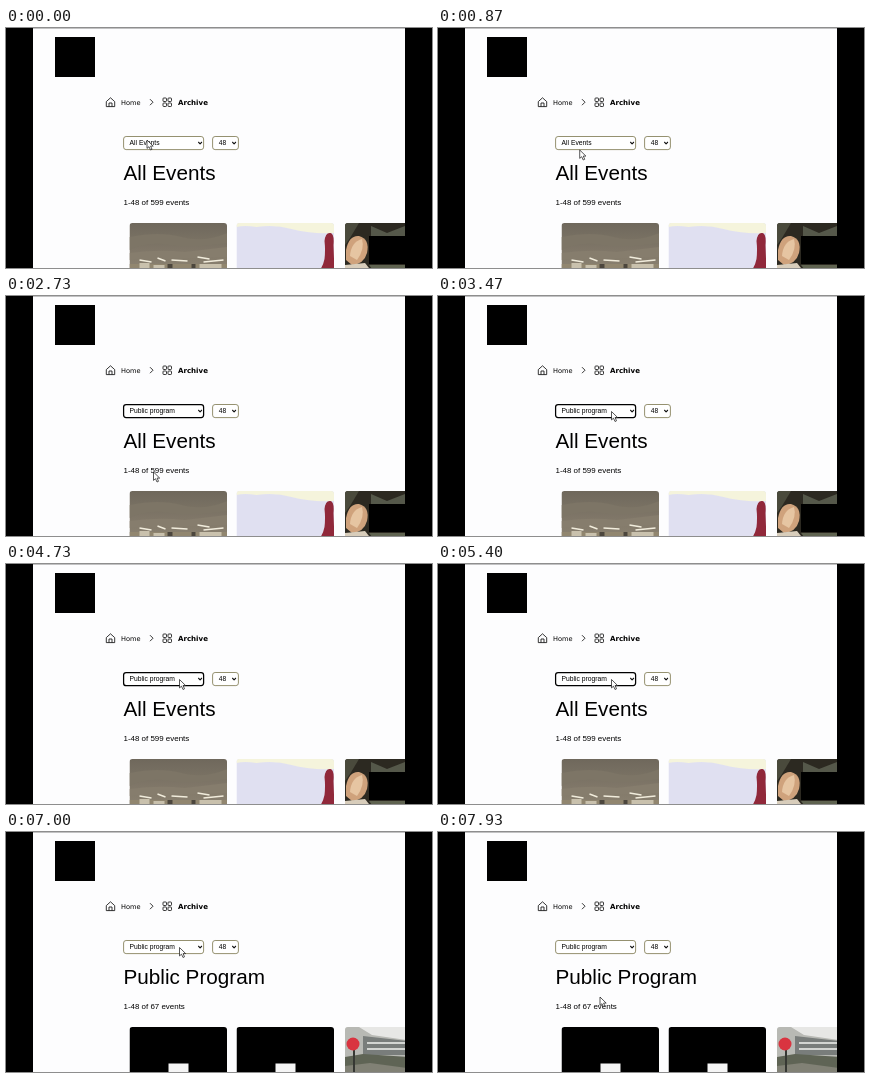
Animation, 426 px wide and 240 px high, one loop 8 s. Source, as an HTML page:

```html
<!DOCTYPE html>
<html lang="en">
<head>
<meta charset="utf-8">
<title>Archive filter</title>
<style>
html, body { margin: 0; width: 100%; height: 100%; overflow: hidden; background: #000; }
svg { display: block; width: 100vw; height: 100vh; }
text { font-family: "Liberation Sans", Arial, sans-serif; fill: #000; }
.nav { font-family: "DejaVu Sans", sans-serif; font-size: 6.6px; }
.small { font-size: 6.75px; }
.head { font-size: 7.3px; font-weight: bold; }
.row { font-size: 10.3px; }
.title { font-size: 20.7px; }
.count { font-size: 7.95px; }
.line { fill: none; stroke: #111; stroke-width: .85; stroke-linejoin: round; }
.field { fill: #fff; stroke: #8a8560; stroke-width: .9; }
.field.focus { stroke: #000; stroke-width: 1.25; }
</style>
</head>
<body>
<svg viewBox="0 0 426 240" preserveAspectRatio="none">
  <defs>
    <clipPath id="page"><rect x="27" width="372" height="240"/></clipPath>
    <clipPath id="card"><rect width="97.5" height="70" rx="3"/></clipPath>
    <linearGradient id="room" x2="0" y2="1">
      <stop stop-color="#6f685c"/><stop offset="1" stop-color="#8d8372"/>
    </linearGradient>
    <path id="arrow" d="M.8 3 2.6 4.8 4.4 3" class="line" style="stroke-width:1.1"/>
  </defs>
  <rect width="426" height="240"/>
  <g clip-path="url(#page)">
    <rect x="27" width="372" height="240" fill="#fdfdfe"/>
    <rect x="27" width="372" height=".8" fill="#b5b5b5"/>
    <rect x="49" y="9" width="40" height="40" fill="#000"/>

    <g class="line">
      <path d="M100.3 73.6 104.5 69.8 108.7 73.6V78.6H100.3ZM103 78.5V75h3v3.5"/>
      <path d="M144 71.2 147 74.2 144 77.2"/>
      <g id="tiles"></g>
    </g>
    <text class="nav" x="115" y="76.7">Home</text>
    <text class="nav" x="172" y="76.8" font-weight="bold" style="font-size:7.05px">Archive</text>

    <rect id="kindBox" class="field" x="117.6" y="108.5" width="80" height="13.1" rx="2.5"/>
    <text id="kind" class="small" x="123.5" y="117.3"></text>
    <use href="#arrow" x="191.5" y="111"/>
    <rect class="field" x="206.6" y="108.5" width="25.8" height="13.1" rx="2.5"/>
    <text id="size" class="small" x="212.7" y="117.3"></text>
    <use href="#arrow" x="225.5" y="111"/>

    <text id="title" class="title" x="117.5"></text>
    <text id="count" class="count" x="117.5" y="177.4"></text>

    <g id="gallery">
      <g transform="translate(123.5 195)" clip-path="url(#card)">
        <rect width="98" height="50" fill="url(#room)"/>
        <path d="M0 14Q30 8 52 14T98 10V20Q60 26 40 22T0 27Z" fill="#7d7566"/>
        <path d="M0 30Q30 26 55 29L98 24V34Q50 36 0 37Z" fill="#867d6d"/>
        <path d="M0 41H98V50H0Z" fill="#91866f"/>
        <path d="M10 40H20V50H10ZM24 42H35V50H24ZM70 41H92V50H70Z" fill="#c9c1ad"/>
        <path d="M38 41H43V50H38ZM62 41H66V50H62Z" fill="#4c463d"/>
        <path d="M10 37 22 39M28 35 36 38M42 37 58 38M68 34 80 36M74 39 94 37" stroke="#f1ecdc" stroke-width="1.4" fill="none"/>
      </g>
      <g transform="translate(230.5 195)" clip-path="url(#card)">
        <rect width="98" height="50" fill="#e0e0f1"/>
        <path d="M0 0H98V10Q72 11 55 6T20 4Q8 2 0 4Z" fill="#f5f4dc"/>
        <path d="M80 50Q86 46 88 36 89 27 88 18 89 9 94 10 98 11 97 22L98 50Z" fill="#90283a"/>
      </g>
      <g transform="translate(339 195)" clip-path="url(#card)">
        <rect width="98" height="50" fill="#2c2921"/>
        <path d="M0 0H14L5 15 0 22Z" fill="#4a4a3c"/>
        <path d="M26 3 42 10 60 3V14H26Z" fill="#55584a"/>
        <path d="M1 27Q4 12 14 13 25 16 22 30 19 41 7 42L1 37Z" fill="#cfa27c"/>
        <path d="M5 33Q6 19 17 16 20 26 12 37Z" fill="#e6c5a2"/>
        <path d="M0 42 20 40 28 50H0Z" fill="#d8cdbb"/>
        <path d="M24 42H62V50H30Z" fill="#5f6350"/>
        <rect x="24" y="13" width="40" height="28" fill="#000"/>
      </g>
    </g>

    <g id="table">
      <text class="head" x="126" y="194.6">#</text>
      <text class="head" x="146" y="194.6">Title</text>
      <text class="head" x="263.5" y="194.6">Type</text>
      <text x="358.7" y="194.6" font-size="7.9">Date</text>
      <path d="M124 240V221Q132 217 145 219 160 213 176 217 205 219 229 217 250 219 270 217 285 211 300 217 315 221 333 218 350 223 366 218 379 212 387 217L400 220V240Z" fill="#e2e3ef"/>
      <text class="row" x="145" y="240.3">Lantern Hour Session</text>
      <text class="small" x="270" y="243">Public program</text>
      <text class="small" x="362" y="243">12 May</text>
    </g>

    <g id="results">
      <g id="blank"></g>
      <g transform="translate(339 195)" clip-path="url(#card)">
        <rect width="98" height="50" fill="#e7e7e5"/>
        <path d="M0 0H14L27 8 62 13V50H0Z" fill="#b8b9b4"/>
        <path d="M18 9 62 14V28H18Z" fill="#797d7b"/>
        <path d="M22 16H62M22 22H62" stroke="#d3d5d2" stroke-width="2"/>
        <path d="M0 30 18 27 62 30V50H0Z" fill="#5f6455"/>
        <path d="M0 39 25 36 62 41V50H0Z" fill="#818175"/>
        <path d="M9 22V45" stroke="#363833" stroke-width="2"/>
        <circle cx="8" cy="17" r="6.5" fill="#d93440"/>
      </g>
    </g>

    <path id="cursor" d="M0 0V8.4L2 6.7 3.5 10 5 9.3 3.6 6.1H6.2Z" fill="#fff" stroke="#111" stroke-width=".7"/>
  </g>
</svg>
<script>
const $ = id => document.getElementById(id);
const LOOP = 8000;
const SELECT = 2600, LOAD = 5700, GRID = 6700;

// time, x, y
const path = [
  [0, 141, 112], [700, 141, 112], [1500, 147, 197], [2000, 147, 197],
  [2500, 147.5, 176], [2750, 147.5, 176], [3300, 173.5, 115.5],
  [7350, 173.5, 115.5], [7930, 162, 165], [LOOP, 162, 165]
];

$('tiles').innerHTML = [0, 1, 2, 3].map(i =>
  `<rect x="${157 + i % 2 * 5}" y="${70 + (i >> 1) * 5}" width="3.5" height="3.5" rx=".8"/>`).join('');
$('blank').innerHTML = [123.5, 230.5].map(x =>
  `<g transform="translate(${x} 195)" clip-path="url(#card)">
    <rect width="98" height="50" fill="#000"/>
    <rect x="39" y="36.5" width="20" height="20" fill="#f5f5f5"/></g>`).join('');

const ease = u => u * u * (3 - 2 * u);

function cursorAt(t) {
  const i = Math.max(1, path.findIndex(p => p[0] > t));
  const a = path[i - 1], b = path[i];
  const u = ease((t - a[0]) / (b[0] - a[0]));
  return [a[1] + (b[1] - a[1]) * u, a[2] + (b[2] - a[2]) * u];
}

const show = (id, on) => $(id).setAttribute('display', on ? 'inline' : 'none');

function render(t) {
  const chosen = t >= SELECT, loaded = t >= LOAD, grid = t >= GRID;
  const table = loaded && !grid;
  $('kind').textContent = chosen ? 'Public program' : 'All Events';
  $('kindBox').classList.toggle('focus', chosen && !loaded);
  $('size').textContent = table ? '12' : '48';
  $('title').textContent = loaded ? 'Public Program' : 'All Events';
  $('title').setAttribute('y', table ? 148.7 : 152);
  $('count').textContent = `1-48 of ${grid ? 67 : 599} events`;
  show('count', !table);
  show('gallery', !loaded);
  show('table', table);
  show('results', grid);
  $('cursor').setAttribute('transform', `translate(${cursorAt(t)})`);
}

function tick() {
  render(performance.now() % LOOP);
  requestAnimationFrame(tick);
}
tick();
</script>
</body>
</html>
```
